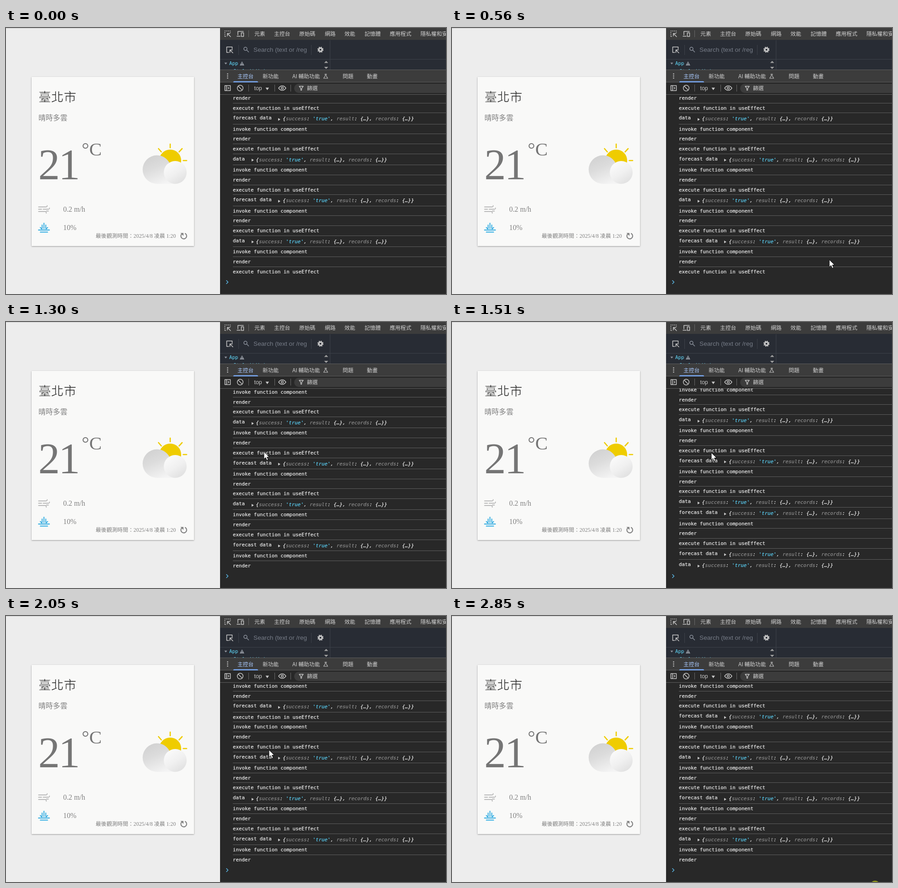
Animation of 962 by 582 pixels, one loop 2920 ms. Source, as an HTML page:

```html
<!DOCTYPE html>
<html lang="zh-Hant">
<head>
<meta charset="utf-8">
<title>Weather card with console</title>
<style>
html, body { margin: 0; width: 100%; height: 100%; overflow: hidden; background: #ededed; }
#stage { position: relative; width: 962px; height: 582px; overflow: hidden; }
svg { position: absolute; left: 0; top: 0; display: block; }
text { white-space: pre; }
.cjk { font-family: "Noto Sans CJK TC", "Noto Sans CJK JP", "Noto Sans CJK", sans-serif; }
.thin { stroke: #f9f9f8; stroke-width: .7px; }
.serif { font-family: "Liberation Serif", "Noto Sans CJK TC", "Noto Sans CJK JP", serif; }
.sans { font-family: "Liberation Sans", sans-serif; }
.mono, #log { font-family: "DejaVu Sans Mono", monospace; font-size: 10.83px; }
.line { fill: none; stroke-linecap: round; stroke-linejoin: round; }
#log {
  position: absolute; left: 496px; top: 146px; width: 466px; height: 398.3px;
  display: flex; flex-direction: column; justify-content: flex-end;
  overflow: hidden; color: #f2f2f2; white-space: pre; line-height: 21px;
  -webkit-text-stroke: .2px;
}
.row { flex: none; box-sizing: border-box; height: 21.75px; border-bottom: 1px solid #5e5e5e; }
.row.obj { height: 24.25px; }
.row.last { border-color: transparent; }
.row[hidden] { display: none; }
.row i { position: relative; top: 2px; }
.row i u { text-decoration: none; color: #8e8e8e; }
.row i s { text-decoration: none; color: #5cd5fb; }
.tri {
  display: inline-block; position: relative; top: 2.5px; margin: 0 5px 0 14.5px;
  border: solid transparent; border-width: 3.5px 0 3.5px 5px; border-left-color: #c7c7c7;
}
</style>
</head>
<body>
<div id="stage">
<svg width="962" height="582" viewBox="0 0 962 582">
  <defs>
    <linearGradient id="back" x1=".2" y1=".05" x2=".65" y2="1">
      <stop offset="0" stop-color="#d2d2d2"/><stop offset=".4" stop-color="#dcdcdc"/><stop offset="1" stop-color="#f4f4f4"/>
    </linearGradient>
    <linearGradient id="front" x1=".2" y1=".1" x2=".8" y2="1">
      <stop offset="0" stop-color="#fafafa"/><stop offset=".5" stop-color="#f0f0f0"/><stop offset="1" stop-color="#dfdfdf"/>
    </linearGradient>
    <clipPath id="field"><path d="M540 34h117.500v28H540z"/></clipPath>
    <clipPath id="tree"><path d="M469 69h239v22H469z"/></clipPath>
  </defs>

  <!-- page and card -->
  <path fill="#ededed" d="M0 0h468v582H0z"/>
  <path fill="#c9c9c9" d="M0 0h468v1H0z"/>
  <path fill="#f9f9f8" style="filter:drop-shadow(0 1px 1.500px #999)" d="M56 107h355v370H56z"/>
  <text class="cjk thin" x="71" y="161" font-size="27.6" fill="#212121">臺北市</text>
  <g fill="#828282">
    <text class="cjk" x="71" y="202" font-size="15.8">晴時多雲</text>
    <g class="serif">
      <text x="70.500" y="330.500" font-size="94.7" letter-spacing="-3" fill="#757575">21</text>
      <text x="165.500" y="279" font-size="41" fill="#757575">°C</text>
      <text x="125" y="402" font-size="15.8">0.2 m/h</text>
      <text x="125" y="442" font-size="15.8">10%</text>
      <text x="196" y="459" font-size="11.83">最後觀測時間：2025/4/8 凌晨 1:20</text>
    </g>
  </g>

  <!-- sun and clouds -->
  <path class="line" stroke="#efcc00" stroke-width="2.600" d="M359 254v8M333.500 264l6 7M385 264l-6.500 7M387.500 290h7.500"/>
  <circle cx="359" cy="290" r="24" fill="#efcc00"/>
  <path fill="url(#back)" d="M330 278.500a31 31 0 0 1 30 23l10 39.500h-40a31.200 31.200 0 0 1 0-62.500z"/>
  <circle cx="370" cy="316" r="25" fill="url(#front)"/>

  <!-- wind, rain, refresh -->
  <path class="line" stroke="#a3a3a3" stroke-width="1.300" d="M71 391.500h17q2.500-.5 2-3M71 396.500h7M81 396.500h12q3-.5 2-3M71 401.500h14q4 .5 3 4M88 400.500h5"/>
  <g class="line" stroke="#29a9e1" stroke-width="1.900">
    <path d="M71 442h24M75 446.500h16"/>
    <path d="M83 427v12M79 431v8M87 431v8M75 436.500l3 3M91 436.500l-3 3"/>
  </g>
  <path class="line" stroke="#808080" stroke-width="2.100" d="M384.700 450.200a6.300 6.300 0 1 0 7.200-.5"/>
  <path fill="#808080" d="M381.500 448.500h6.500v6.500z"/>

  <!-- developer tools -->
  <path fill="#282828" d="M468 0h494v582H468z"/>
  <path fill="#3c3c3c" d="M468 0h494v26H468zM468 92h494v26H468z"/>
  <path fill="#282c34" d="M468 26h494v66H468z"/>
  <path fill="#3d424a" d="M468 68h494v1H468zM708 27h1v64h-1zM508 37h1v22h-1zM667 37h1v22h-1z"/>
  <path fill="#5e5e5e" d="M468 91h494v1H468zM468 118h494v1H468zM468 145h494v1H468z"/>
  <path fill="#6a6a6a" d="M530 5h1v15h-1zM530 124h1v15h-1zM587 124h1v15h-1zM622 124h1v15h-1z"/>
  <path fill="#3c3c3c" d="M962 122H640a10 10 0 0 0 0 20h322z"/>
  <g id="tabs" class="cjk" font-size="11.8" fill="#d0d0d0"></g>
  <path fill="#7cacf8" d="M497 119v-1q0-1.500 2-1.500h50q2 0 2 1.500v1z"/>

  <g class="line" stroke="#c7c7c7" stroke-width="1.500">
    <path stroke-dasharray="2 1.800" stroke-linecap="butt" d="M478.500 18.500v-12h12v4M478.500 18.500h4"/>
    <path d="M491 19l-7-7M484 17.500V12h5.500"/>
    <path d="M507 15V7.500h12M505 18h7M514.500 10.500h5v8h-5z"/>
    <path d="M487 53.500h-4.500v-12h12V46M496 54.500l-6-6M489.500 53.500v-5.500h5.500"/>
    <circle cx="523.500" cy="45.500" r="3.500" stroke="#8a909b"/>
    <path stroke="#8a909b" d="M526.500 48.500l4 4"/>
    <path d="M478.500 126h12v11h-12zM482 126v11M485 129.500l2.500 2-2.500 2"/>
    <circle cx="512" cy="131.500" r="6.300"/>
    <path d="M507.700 127.200l8.600 8.600"/>
    <path d="M596 131.500q3.500-5 8-5t8 5q-3.500 5-8 5t-8-5z"/>
    <circle cx="604" cy="131.500" r="2.300"/>
    <path stroke-width="1.300" d="M641 127.500h9l-3.500 4.500v4h-2v-4z"/>
    <path stroke-width="1.100" d="M697 101h4M698 101v3.500l-3.500 5.500h9l-3.500-5.500V101"/>
    <circle cx="687.500" cy="47.500" r="3.500" stroke-width="3"/>
    <circle cx="687.500" cy="47.500" r="5.500" stroke-width="2.200" stroke-linecap="butt" stroke-dasharray="2.400 1.920"/>
  </g>
  <g fill="#c7c7c7">
    <circle cx="484.500" cy="100.500" r="1.300"/><circle cx="484.500" cy="105" r="1.300"/><circle cx="484.500" cy="109.500" r="1.300"/>
    <path d="M567.500 130.500h7.500l-3.750 5.500z"/>
    <path fill="#a0a0a0" d="M695.500 76.500h9l-4.500-4.500zM695.500 85h9l-4.500 4.500z"/>
    <path fill="#8f949d" d="M477.500 75.800h6l-3 4zM516 73l5 9h-10z"/>
    <path fill="#282c34" d="M515.500 76h1v3h-1zM515.500 80h1v1h-1z"/>
    <text class="sans" x="542.500" y="136" font-size="12.3">top</text>
  </g>
  <text class="sans" x="541" y="52" font-size="13.7" fill="#777d88" clip-path="url(#field)">Search (text or /regex/)</text>
  <g class="mono" fill="#61dafb" clip-path="url(#tree)">
    <text x="488" y="81">App</text>
    <text x="497" y="98">Styled(div)</text>
  </g>
  <path class="line" stroke="#5cb9e8" stroke-width="1.500" d="M482 552.500l3.500 3.500-3.500 3.500"/>
</svg>
<div id="log"></div>
<svg width="962" height="582" viewBox="0 0 962 582">
  <path id="pointer" fill="#fff" stroke="#111" stroke-width="1" d="M0 0v16l3.700-3.500 2.700 6.100 2.800-1.200-2.700-5.900h5z"/>
  <circle id="halo" cx="925" cy="590" r="11" fill="#8c931f"/>
</svg>
</div>
<script>
const LOOP = 2920;
const $ = id => document.getElementById(id);

const tabs = [
  [543, 17, '元素'], [586, 17, '主控台'], [641, 17, '原始碼'], [697, 17, '網路'],
  [740, 17, '效能'], [784, 17, '記憶體'], [839, 17, '應用程式'], [906, 17, '隱私權和安全性'],
  [506, 109.5, '主控台', '#a8c7fa'], [561, 109.5, '新功能'], [626, 109.5, 'AI 輔助功能'],
  [736, 109.5, '問題'], [789, 109.5, '動畫'], [658, 136, '篩選']
];
$('tabs').innerHTML = tabs.map(([x, y, label, fill = '#d0d0d0']) =>
  `<text x="${x}" y="${y}" fill="${fill}">${label}</text>`).join('');

// time, messages logged, pointer position (omitted: out of view)
const steps = [
  [0, 'IREFIREDIREFIREDIRE'],
  [70, 'FIRE'],
  [200, 'DIRE'],
  [420, '', 880, 565],
  [490, 'FIRE', 858, 540],
  [560, '', 825, 507],
  [630, '', 752, 446],
  [700, '', 675, 385],
  [760, '', 612, 345],
  [830, '', 576, 325],
  [900, '', 566, 321],
  [1030, 'DIR', 566, 314],
  [1100, '', 565, 300],
  [1170, 'EFIR', 564, 290],
  [1300, '', 564, 284],
  [1370, 'E', 564, 284],
  [1440, 'DFIR', 565, 285],
  [1510, 'EFD', 567, 286],
  [1580, 'IRE', 570, 288],
  [1650, 'DIR', 573, 290],
  [1710, 'FE', 575, 291],
  [1780, 'IRE', 575, 291],
  [1850, 'FIRE', 575, 291],
  [1980, 'DIRE', 575, 291],
  [2050, 'FIR', 575, 293],
  [2120, '', 562, 340],
  [2190, 'EDIR', 528, 430],
  [2260, '', 485, 535],
  [2330, ''],
  [2590, 'E'],
  [2790, 'FIRE'],
  [2850, 'DIR']
];

const preview = `<span class="tri"></span><i>{<u>success</u>: <s>'true'</s>, <u>result</u>: {…}, <u>records</u>: {…}}</i>`;
const messages = {
  I: 'invoke function component',
  R: 'render',
  E: 'execute function in useEffect',
  D: 'data' + preview,
  F: 'forecast data' + preview
};

$('log').innerHTML = [...steps.map(s => s[1]).join('')].map(k =>
  `<div class="row${'DF'.includes(k) ? ' obj' : ''}">${messages[k]}</div>`).join('');
const rows = [...$('log').children];

let total = 0;
const counts = steps.map(s => total += s[1].length);

let shown = -1;
function show(i) {
  if (i === shown) return;
  shown = i;
  const [time, , x, y] = steps[i];
  rows.forEach((row, n) => {
    row.hidden = n >= counts[i];
    row.classList.toggle('last', n === counts[i] - 1);
  });
  $('pointer').style.display = x === undefined ? 'none' : '';
  if (x !== undefined) $('pointer').setAttribute('transform', `translate(${x} ${y})`);
  $('halo').style.display = time >= 2850 ? '' : 'none';
}

const start = performance.now();
function tick() {
  const t = (performance.now() - start) % LOOP;
  show(steps.filter(s => s[0] <= t).length - 1);
  requestAnimationFrame(tick);
}
tick();
</script>
</body>
</html>
```
